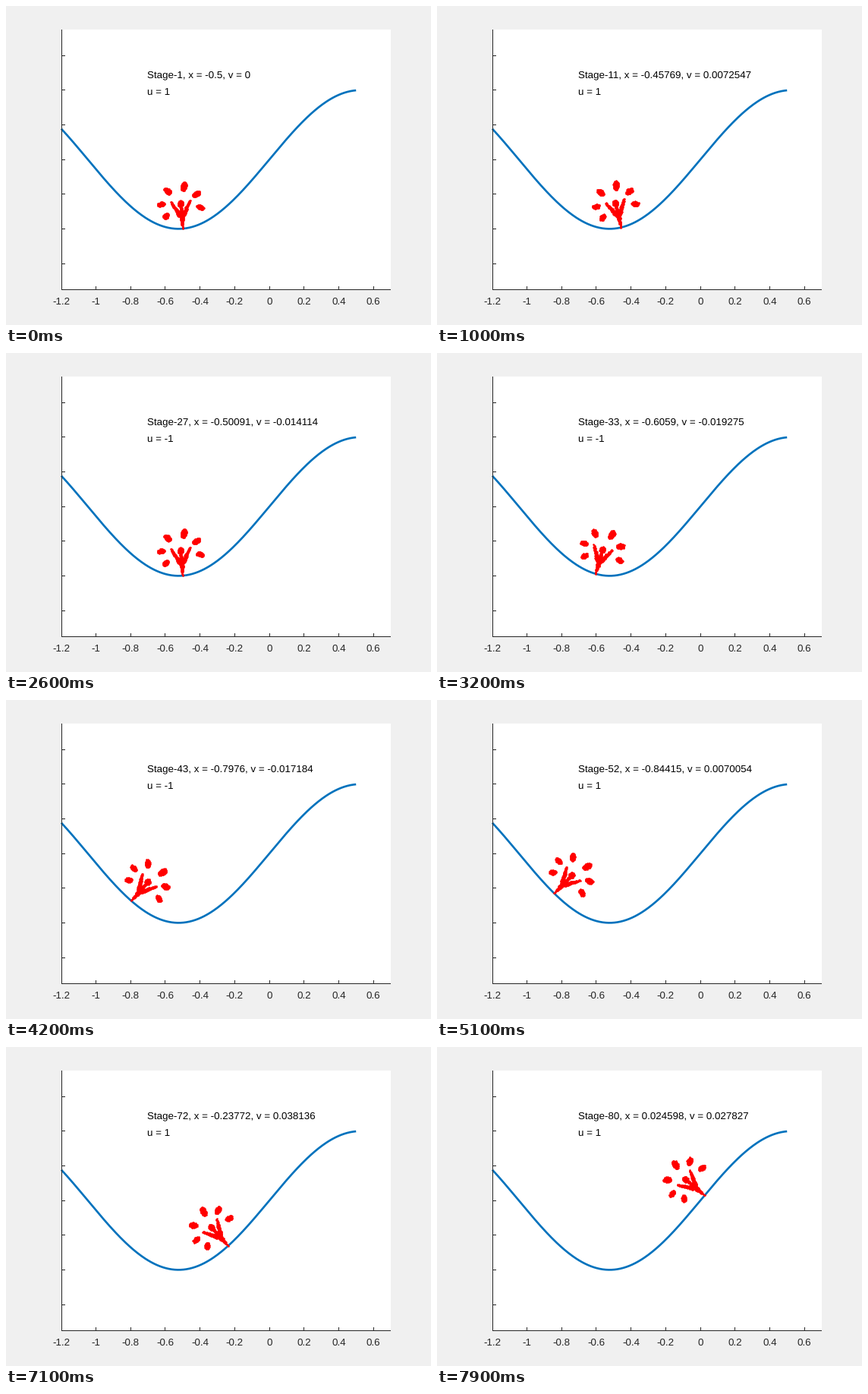
Animation, 560 px wide and 420 px high, one loop 8000 ms. Source, as a matplotlib script:

```python
import numpy as np
import matplotlib as mpl
import matplotlib.pyplot as plt
from matplotlib.animation import FuncAnimation

mpl.rcParams.update({"font.family": "Liberation Sans", "text.hinting": "none"})

W, H, DPI = 560, 420, 100
PT = 72 / DPI                      # points per pixel
LEFT, RIGHT, TOP, BOTTOM = 73, 507, 31, 374
SX, SY = 434 / 1.9, 342.3 / 3.75   # pixels per data unit
INK = "#262626"


def px(x):
    return 72.9 + (x + 1.2) * SX


def py(y):
    return 202.1 - y * SY


# Mountain car: push right, coast, push left, coast, push right
pushes = [1] * 11 + [0] * 2 + [-1] * 30 + [0] + [1] * 36


def simulate(x=-0.5, v=0.0):
    states = []
    for u in pushes:
        states.append((x, v, u))
        v += 0.001 * u - 0.0025 * np.cos(3 * x)
        x += v
    return states


# Tree as a dot grid; origin at the foot of the trunk, y up
gx, gy = np.meshgrid(np.arange(-36, 37, 1.0), np.arange(0, 66, 1.0))


def limb(x0, y0, r0, x1, y1, r1):
    dx, dy = x1 - x0, y1 - y0
    t = np.clip(((gx - x0) * dx + (gy - y0) * dy) / (dx * dx + dy * dy), 0, 1)
    return np.hypot(gx - x0 - t * dx, gy - y0 - t * dy) <= r0 + t * (r1 - r0)


def leaf(cx, cy, a, b):
    ang = np.arctan2(cy - 34, cx)
    c, s = np.cos(ang), np.sin(ang)
    along = (gx - cx) * c + (gy - cy) * s
    across = (gy - cy) * c - (gx - cx) * s
    return (along / a) ** 2 + (across / b) ** 2 <= 1


def make_tree():
    mask = limb(0, 0, 0.3, 0, 20, 3.4) | limb(0, 20, 2, 0, 27, 1.5)
    for side in (-1, 1):
        mask |= limb(side * 2.5, 18, 2.4, side * 7.3, 27, 1.7)
        mask |= limb(side * 7.3, 27, 1.7, side * 12.8, 36.3, 0.7)
    leaves = [(-20.6, 18.5, 4.8, 3.0), (-25.7, 34.4, 5.3, 2.8),
              (-15.7, 51.2, 5.5, 3.4), (6.2, 55.6, 6.3, 3.7),
              (21.8, 44, 5.5, 3.5), (25.4, 26.1, 5.0, 3.0),
              (0, 33, 4.1, 3.6)]
    for spec in leaves:
        mask |= leaf(*spec)
    return gx[mask], gy[mask]


states = simulate()
tree_x, tree_y = make_tree()

fig = plt.figure(figsize=(W / DPI, H / DPI), dpi=DPI, facecolor="#f0f0f0")
ax = fig.add_axes([0, 0, 1, 1])
ax.set(xlim=(0, W), ylim=(H, 0))
ax.axis("off")


def rule(xs, ys):
    ax.plot(xs, ys, color=INK, lw=PT, solid_capstyle="butt", snap=False,
            zorder=3)


def mid(p):
    return np.floor(p) + 0.5


def label(x, y, s, **kw):
    return ax.text(x, y, s, fontsize=13.333 * PT, va="baseline", **kw)


ax.add_patch(plt.Rectangle((LEFT, TOP), RIGHT - LEFT, BOTTOM - TOP,
                           fc="white", ec="none", zorder=0))
rule([mid(LEFT)] * 2, [TOP, BOTTOM])
rule([LEFT, RIGHT], [BOTTOM - 0.5] * 2)
for k in range(-6, 4):
    x = px(k / 5)
    if k > -6:
        rule([mid(x)] * 2, [BOTTOM - 5, BOTTOM])
    label(x, 393, f"{k / 5:g}", ha="center", color=INK)
for k in range(-3, 4):
    rule([LEFT, LEFT + 5], [mid(py(k / 2))] * 2)

hill = np.linspace(-1.2, 0.5, 300)
ax.plot(px(hill), py(np.sin(3 * hill)), color="#0072bd", lw=2.67 * PT,
        solid_capstyle="butt", zorder=2)

tree, = ax.plot([], [], "o", color="red", ms=2.6 * PT, mew=0, zorder=4)
status = label(186, 94, "", color="black")
action = label(186, 118, "", color="black")


def update(i):
    x, v, u = states[i]
    tilt = np.arctan(3 * np.cos(3 * x) * SY / SX)
    c, s = np.cos(tilt), np.sin(tilt)
    tree.set_data(px(x) + tree_x * c - tree_y * s,
                  py(np.sin(3 * x)) - tree_x * s - tree_y * c)
    status.set_text(f"Stage-{i + 1}, x = {x:.5g}, v = {v:.5g}")
    action.set_text(f"u = {u}")
    return tree, status, action


anim = FuncAnimation(fig, update, frames=len(states), interval=100,
                     repeat=True, repeat_delay=0)
plt.show()
```
